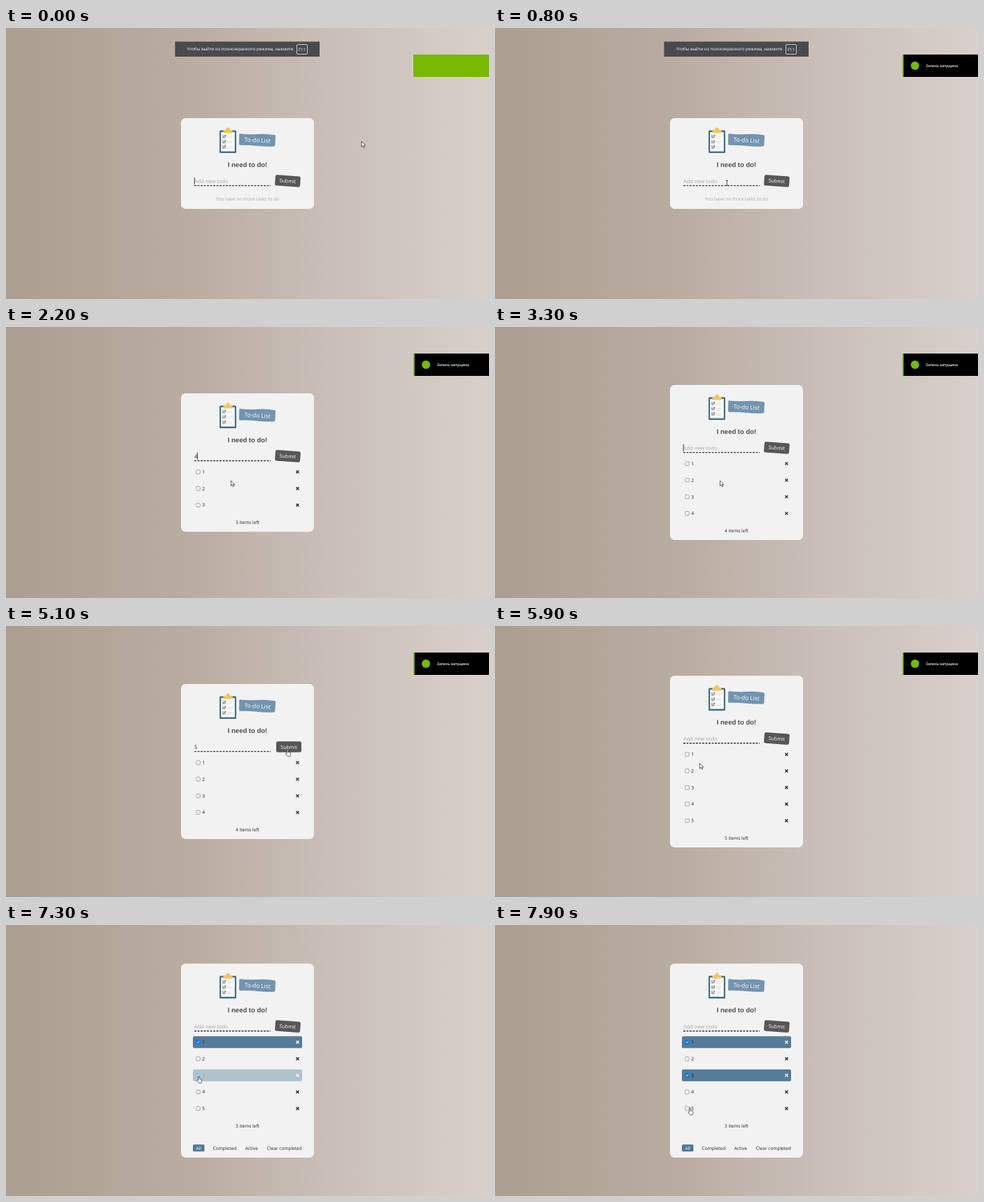
Animation of 690 by 388 pixels, one loop 8 s. Source, as an HTML page:

```html
<!DOCTYPE html>
<html lang="en">
<head>
<meta charset="utf-8">
<title>To-do list</title>
<style>
  html, body { margin: 0; width: 100%; height: 100%; overflow: hidden; }
  body { background: linear-gradient(90deg, #ac9e90, #b9aca1 38%, #c9beb8 66%, #d9d0cb); }
  svg { display: block; width: 100%; height: 100%; }
  text { font: 6.55px "Open Sans", "Noto Sans", sans-serif; fill: #222; text-rendering: geometricPrecision; white-space: pre; }
  .mid { text-anchor: middle; }
  .white { fill: #fff; }
  .pale { fill: #a9a9a9; }
  .field { font-size: 7.5px; }
  .title { font: bold 9.5px "Liberation Sans", Arial, sans-serif; fill: #4b4b4d; }
  .cross { fill: none; stroke: #222; stroke-width: 1.3; }
  .box { fill: #fff; stroke: #777; stroke-width: .7; }
  .tick, .bar { visibility: hidden; }
  .done .tick, .done .bar { visibility: visible; }
  .done .box { fill: #0b76f0; stroke: #0b76f0; }
  .done .cross { stroke: #fff; }
  .tick { fill: none; stroke: #fff; stroke-width: .9; }
</style>
</head>
<body>
<svg viewBox="0 0 690 388" preserveAspectRatio="none">
  <defs>
    <clipPath id="toastClip"><rect x="582" y="38" width="108" height="32"/></clipPath>
  </defs>

  <g id="banner">
    <rect x="241.5" y="19.5" width="206.5" height="21.5" fill="#484a4d"/>
    <text x="258.5" y="32.3" class="white" style="font-size:6.05px">Чтобы выйти из полноэкранного режима, нажмите</text>
    <rect x="415.5" y="23.5" width="15" height="14" rx="1.5" fill="none" stroke="#e8e8e8" stroke-width=".8"/>
    <text x="423" y="32.5" class="white mid" style="font-size:6px">F11</text>
  </g>

  <g clip-path="url(#toastClip)">
    <rect id="toastGreen" x="582" y="38" width="108" height="32" fill="#76b900"/>
    <g id="toastBlack">
      <rect x="583.8" y="38" width="108" height="32" fill="#000"/>
      <g id="toastText">
        <circle cx="600" cy="54" r="6" fill="#76b900"/>
        <text x="615.5" y="56.2" class="white" style="font-size:5.15px;font-weight:600">Запись запущена</text>
      </g>
    </g>
  </g>

  <g id="card">
    <rect id="panel" x="250" width="190" rx="6.5" fill="#f2f2f2"/>

    <g id="clipboard">
      <rect x="305" y="17.5" width="24" height="32.5" rx="1.5" fill="#456e87"/>
      <rect x="307.2" y="20" width="19.6" height="27.6" fill="#fafafa"/>
      <path d="M310.3 21.5V18.6q0-1.6 2-1.6h1.7q.4-3.6 3-3.6t3 3.6h1.7q2 0 2 1.6v2.9z" fill="#f3c65a"/>
      <g id="checks"></g>
    </g>

    <path d="M334.3 22.2q10 1.5 25 .7t24.5 1.4q1.5.2 1.3 2l-.7 12.5q-.2 1.7-2 1.8-12 .3-24-.9t-23.6-.9q-1.8-.1-1.8-2l.2-13q.1-1.5 1.1-1.6z" fill="#7294b0"/>
    <text class="mid white" style="font-size:8.3px" transform="translate(359 34.6) rotate(3)">To-do List</text>

    <text x="345" y="70.3" class="mid title">I need to do!</text>
    <text id="placeholder" x="269" y="92.8" class="field pale">Add new todo</text>
    <text id="entry" x="269" y="92.8" class="field"></text>
    <path id="caret" d="M0 84.8v10.4" stroke="#111" stroke-width=".8"/>
    <path d="M269 96.6h109" stroke="#3c3c3e" stroke-width="1.4" stroke-dasharray="3 1.5"/>

    <g id="submit">
      <rect x="-18" y="-7.7" width="36" height="15.4" rx="2.5" fill="#575659"/>
      <text y="2.6" class="mid white" style="font-size:7.1px">Submit</text>
    </g>

    <g id="rows"></g>
    <text id="status" x="345" class="mid"></text>

    <g id="filters">
      <rect x="267" y="259" width="16.5" height="10.2" rx="1.5" fill="#4f7895"/>
      <text x="275.3" y="266.6" class="mid white">All</text>
      <text x="295.7" y="266.6">Completed</text>
      <text x="341.7" y="266.6">Active</text>
      <text x="372.8" y="266.6">Clear completed</text>
    </g>
  </g>

  <g id="pointer" stroke-linejoin="round">
    <path id="arrow" d="M0 0v7.6l1.8-1.6 1.2 2.7 1.3-.6-1.2-2.6h2.3z" fill="#fff" stroke="#222" stroke-width=".7"/>
    <path id="beam" d="M-1.5-3.5h3M0-3.5v7M-1.5 3.5h3" fill="none" stroke="#222" stroke-width=".8"/>
    <path id="hand" d="M-.7 5.6V.5q0-.9.8-.9t.8.9v3l2.9.6q1 .3.9 1.3l-.5 2.6-.6 1.6h-3.3L-2.4 6.4q-.3-1 .6-1.1z" fill="#fff" stroke="#222" stroke-width=".7"/>
  </g>
</svg>

<script>
const LOOP = 8000, STEP = 100, ROW = 23.75;
const $ = id => document.getElementById(id);
const set = (id, name, value) => $(id).setAttribute(name, value);
const show = (id, on) => { $(id).style.visibility = on ? 'visible' : 'hidden'; };
const ramp = (t, from, to) => Math.min(1, Math.max(0, (t - from) / (to - from)));
const ease = k => k * k * (3 - 2 * k);
const stepAt = (track, t) => track.findLast(key => key[0] <= t)[1];

const entries = [[0, ''], [1300, '1'], [1500, ''], [1600, '2'], [1800, ''], [1900, '3'],
                 [2200, '4'], [2700, ''], [3700, '5'], [5200, '']];
const counts = [[0, 0], [1500, 1], [1800, 2], [2200, 3], [2700, 4], [5200, 5]];
const caretOn = [[0, 1], [500, 0], [1000, 1], [2800, 0], [3300, 1], [4400, 0]];
const shapes = [[0, 'arrow'], [800, 'beam'], [1500, 'arrow'], [4700, 'hand'], [5400, 'arrow'],
                [6100, 'hand'], [6400, 'arrow'], [6700, 'hand'], [7400, 'arrow'], [7700, 'hand']];
const ticked = { 1: 6300, 3: 7100 };

// time, x, y of the pointer's hot spot
const path = [
  [0, 508, 162.5], [900, 325, 224], [1400, 325, 224], [1500, 321.5, 220], [3700, 321.5, 220],
  [3800, 323, 219.5], [3900, 323, 219.5], [4200, 344, 207.5], [4300, 344, 207.5],
  [4800, 402, 177], [5200, 402, 177], [5700, 310, 210], [6100, 275, 183], [6300, 275, 183],
  [6500, 280.5, 219], [6800, 275, 213], [7200, 275, 213], [7800, 278.5, 262.3], [8000, 278.5, 262.3]
];

function pointerAt(t) {
  const i = path.findIndex(key => key[0] > t);
  const [a, b] = [path[i - 1], path[i]];
  const k = ease(ramp(t, a[0], b[0]));
  return [a[1] + (b[1] - a[1]) * k, a[2] + (b[2] - a[2]) * k];
}

$('checks').innerHTML = [26.5, 34, 41.5].map(y => `
  <rect x="309.3" y="${y - 2}" width="4" height="4" fill="none" stroke="#888" stroke-width=".6"/>
  <path d="M310 ${y - .5}l1.3 1.6 2.8-3.6" fill="none" stroke="#333" stroke-width=".8"/>
  <path d="M316 ${y - .5}h8M316 ${y + 1.7}h6" stroke="#d2d2d2" stroke-width=".7"/>`).join('');

$('rows').innerHTML = [1, 2, 3, 4, 5].map(n => `
  <g transform="translate(0 ${112.6 + (n - 1) * ROW})">
    <rect class="bar" x="267" y="-8.5" width="156" height="17" rx="2" fill="#547b98"/>
    <rect class="box" x="271.8" y="-2.7" width="5.4" height="5.4" rx=".9"/>
    <path class="tick" d="M273 0l1.1 1.2 2-2.5"/>
    <text x="280.2" y="2.5" style="font-size:6.8px">${n}</text>
    <path class="cross" d="M414.5-2l4 4m0-4l-4 4"/>
  </g>`).join('');

function draw(t) {
  const count = stepAt(counts, t), entry = stepAt(entries, t);
  const filtered = t >= ticked[1];
  const height = count ? 127 + ROW * count + (filtered ? 32 : 0) : 130;
  set('card', 'transform', `translate(0 ${194 - height / 2})`);
  set('panel', 'height', height);

  $('entry').textContent = entry;
  show('placeholder', !entry);
  show('caret', stepAt(caretOn, t));
  set('caret', 'transform', `translate(${entry ? 273.4 : 269.2} 0)`);

  let left = count;
  [...$('rows').children].forEach((row, i) => {
    const since = ticked[i + 1], done = t >= since;
    row.style.display = i < count ? '' : 'none';
    row.classList.toggle('done', done);
    row.style.opacity = done ? ramp(t, since, since + 500) : 1;
    if (done) left--;
  });
  const status = $('status');
  status.textContent = count ? `${left} item${left > 1 ? 's' : ''} left` : 'You have no more tasks to do';
  status.classList.toggle('pale', !count);
  set('status', 'y', count ? 115.9 + ROW * count : 118.3);
  show('filters', filtered);

  const hover = ramp(t, 4600, 4800) - ramp(t, 5300, 5500);
  set('submit', 'transform', `translate(${402.5 + 1.5 * hover} 90) rotate(${4 * (1 - hover)})`);

  $('banner').style.opacity = 1 - ramp(t, 800, 1200);
  const cover = ease(ramp(t, 200, 500)) - ease(ramp(t, 5900, 6200));
  set('toastBlack', 'transform', `translate(${108 * (1 - cover)} 0)`);
  $('toastText').style.opacity = ramp(t, 400, 700);
  set('toastGreen', 'transform', `translate(${108 * ease(ramp(t, 6100, 6400))} 0)`);

  const shape = stepAt(shapes, t);
  ['arrow', 'beam', 'hand'].forEach(id => show(id, id === shape));
  set('pointer', 'transform', `translate(${pointerAt(t)})`);
}

function tick() {
  draw(Math.floor(performance.now() % LOOP / STEP) * STEP);
  requestAnimationFrame(tick);
}
tick();
</script>
</body>
</html>
```
